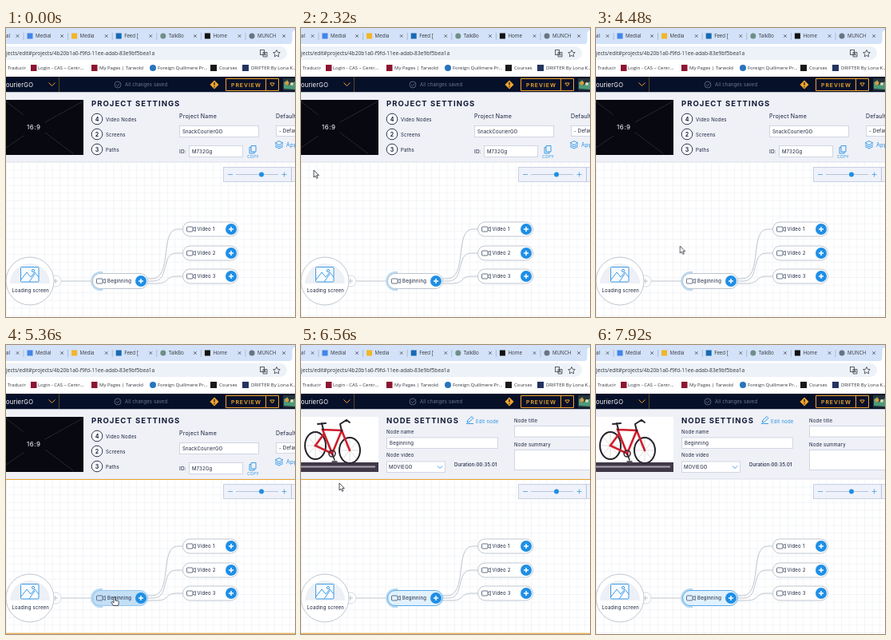
These frames come from a looping animation (362 by 362 pixels, 8 s). An HTML page:

```html
<!DOCTYPE html>
<html lang="en">
<head>
<meta charset="utf-8">
<title>Project editor</title>
<style>
  html, body { margin: 0; width: 100%; height: 100%; overflow: hidden; background: #fff; }
  svg { display: block; width: 100vw; height: 100vh; }
  text { font: 6px Inter, sans-serif; letter-spacing: .2px; fill: #18213c; }
  .chrome text { font: 6px "Open Sans", "Noto Sans", sans-serif; letter-spacing: 0; fill: #30343b; }
  .chrome .url { font-size: 6.65px; }
  .chrome .tab { font-size: 6.2px; }
  text.title { font-size: 9.5px; font-weight: 700; letter-spacing: 1.05px; fill: #111a36; }
  text.label { font-size: 7px; }
  .field { fill: #fff; stroke: #c9cedb; stroke-width: .8; }
  .wire { fill: none; stroke: #b7bfca; stroke-width: .9; }
  .blue { fill: none; stroke: #3b9be6; stroke-width: 1; stroke-linejoin: round; }
  .orange { fill: none; stroke: #efa32c; stroke-width: 1; }
</style>
</head>
<body>
<svg viewBox="0 0 362 362" preserveAspectRatio="none">
  <defs>
    <pattern id="grid" width="9.6" height="9.6" patternUnits="userSpaceOnUse" y="168">
      <path d="M0 .5H9.6M.5 0V9.6" stroke="#eff1f4" stroke-width=".8" fill="none"/>
    </pattern>
    <g id="camera" fill="none" stroke="#56627a" stroke-width=".9" stroke-linejoin="round">
      <rect x="-5.5" y="-3" width="7.5" height="6" rx="1"/>
      <path d="M2-.8L5.3-2.7V2.7L2 .8"/>
    </g>
    <g id="add">
      <circle r="7" fill="#1f8fe6"/>
      <path d="M-3 0H3M0-3V3" stroke="#fff" stroke-width="1.5"/>
    </g>
  </defs>

  <g class="chrome">
    <rect width="362" height="24" fill="#d3e2f8"/>
    <path d="M356 20Q358.500 19 358.500 15V7Q359 3 362 3V20Z" fill="#fff"/>
    <rect y="20" width="362" height="41" fill="#fff"/>
    <rect x="-12" y="23" width="364" height="17" rx="8.500" fill="#edf1f8"/>
    <text class="url" x="0" y="34.300">jects/edit#projects/4b20b1a0-f9fd-11ee-adab-83e9bf5bea1a</text>
    <g fill="none" stroke="#4c5059" stroke-width=".9">
      <rect x="318.500" y="27.500" width="5" height="6"/>
      <path d="M322 30.500H327V36H322Z M323.500 34.500L324.600 31.700L325.700 34.500"/>
      <path d="M339 27.500l1.300 2.800 3 .4-2.200 2.100.6 3.100-2.700-1.500-2.700 1.500.6-3.100-2.200-2.100 3-.4z"/>
    </g>
    <g id="tabs"></g>
    <text x="2" y="52.200">Traducir</text>
    <rect x="31" y="46" width="7.500" height="8" fill="#8c1531"/>
    <text x="40" y="52.200">Login - CAS – Centr...</text>
    <rect x="107" y="46" width="7.500" height="8" fill="#8c1531"/>
    <text x="117" y="52.200">My Pages | Tarwold</text>
    <circle cx="184" cy="50" r="4" fill="#2874bd"/>
    <text x="190" y="52.200">Foreign Quillmere Pr...</text>
    <rect x="256" y="46" width="8" height="8" fill="#191919"/>
    <text x="267" y="52.200">Courses</text>
    <rect x="296" y="46" width="8" height="8" fill="#23345f"/>
    <text x="307" y="52.200">DRIFTER By Lona K...</text>
  </g>

  <rect y="61" width="362" height="19.500" fill="#071029"/>
  <text x="0" y="73.800" style="font-size:7.600px;fill:#fff">ourierGO</text>
  <path class="orange" d="M53.500 68.500L57.500 72.500L61.500 68.500"/>
  <path d="M66.500 61V80" stroke="#6d5427" stroke-width=".8"/>
  <g fill="none" stroke="#697289" stroke-width=".8">
    <circle cx="140" cy="71" r="4"/><path d="M138 71L139.600 72.700L142.300 69.500"/>
  </g>
  <text x="149" y="73" style="font-size:5.800px;fill:#737b90">All changes saved</text>
  <path d="M261 65.500L266.500 71L261 76.500L255.500 71Z" fill="#f3a52c"/>
  <path d="M261 68V71.700M261 73V74.200" stroke="#071029" stroke-width="1.200"/>
  <path class="orange" d="M275.500 63.500H341.500V78.500H275.500ZM325.500 63.500V78.500M330.800 69H336.200L333.500 73Z" stroke-width=".9"/>
  <text x="282" y="73.500" style="font-size:6.800px;font-weight:600;letter-spacing:1px;fill:#f6a92f">PREVIEW</text>
  <rect x="347" y="63" width="15" height="15.500" fill="#24323b"/>
  <path d="M348 76V68L353 65V72L362 67V77Z" fill="#4c9a78"/>
  <circle cx="352" cy="69" r="2.500" fill="#d79a3d"/><circle cx="358" cy="70" r="2" fill="#ddd8bb"/>

  <rect y="80.500" width="362" height="87.500" fill="#eff1f7"/>
  <g id="project">
    <rect y="90" width="97" height="69" fill="#070810"/>
    <path d="M0 92L22 109M49 131L85 158M96 92L49 118M22 135L0 150" stroke="#5d6069" stroke-width=".6" stroke-dasharray="1.500 1"/>
    <text x="26" y="127" style="font-size:8px;letter-spacing:.5px;fill:#fff">16:9</text>
    <text class="title" x="107" y="98">PROJECT SETTINGS</text>
    <g id="counts"></g>
    <text class="label" x="217" y="113">Project Name</text>
    <rect class="field" x="217.500" y="122.500" width="99" height="14"/>
    <text x="221" y="131.700">SnackCourierGO</text>
    <text class="label" x="217" y="157" style="font-size:6.500px">ID:</text>
    <rect class="field" x="229.500" y="147.500" width="67" height="14"/>
    <text x="233" y="157">M732Gg</text>
    <path class="blue" d="M307 147.500H313V155H307ZM307 149.500H305V157H311V155"/>
    <text x="302" y="162.500" style="font-size:5px;fill:#2b91e2">COPY</text>
    <text class="label" x="338" y="113">Default</text>
    <rect class="field" x="338.500" y="122.500" width="30" height="13"/>
    <text x="342" y="131">- Default</text>
    <path class="blue" d="M342 141.500L347 144L342 146.500L337 144ZM337 146.300L342 148.800L347 146.300M337 148.500L342 151L347 148.500"/>
    <text class="label" x="351" y="148.700" style="fill:#2b91e2">Apply</text>
  </g>

  <g id="node" opacity="0">
    <rect y="90" width="97" height="69" fill="#fff"/>
    <g fill="none" stroke-linecap="round">
      <g stroke="#242329" stroke-width="2">
        <ellipse cx="18" cy="126" rx="13" ry="17"/><ellipse cx="61" cy="132" rx="13" ry="16"/>
      </g>
      <g stroke="#aaa6a8" stroke-width=".4">
        <path d="M18 110V142M6 126H30M9 115L27 137M27 115L9 137M61 117V147M49 132H73M52 121L70 143M70 121L52 143"/>
      </g>
      <path d="M27 106L51 107L39 136ZM27 106L39 136L18 126L29 111M51 107L61 132" stroke="#cf1e2d" stroke-width="2.600"/>
      <path d="M21 99L31 98M26 98L28 106M49 99L51 108M49 99L57 94L61 97" stroke="#26242a" stroke-width="2"/>
      <circle cx="39" cy="136" r="4" stroke="#333038" stroke-width="1.600"/>
      <path d="M39 136L42 144M39 146H45" stroke="#26242a" stroke-width="1.500"/>
    </g>
    <rect y="147" width="97" height="12" fill="#30283a" opacity=".92"/>
    <path d="M0 152.500H93" stroke="#aaa6ae" stroke-width="2"/>
    <text class="title" x="107" y="98">NODE SETTINGS</text>
    <path class="blue" d="M208 97L209 94L214 89.500L216 91.500L211 96.200ZM207 98.500H216"/>
    <text x="219" y="97.700" style="fill:#2b91e2">Edit node</text>
    <text x="107" y="110.500">Node name</text>
    <rect class="field" x="107.500" y="116" width="139" height="13.500"/>
    <text x="111" y="125">Beginning</text>
    <text x="107" y="140">Node video</text>
    <rect class="field" x="107.500" y="146" width="73" height="13.500"/>
    <text x="110" y="155">MOVIEGO</text>
    <path class="blue" d="M171 151.500L174 154.500L177 151.500"/>
    <text x="192" y="152.200" style="font-size:5.900px;font-weight:500">Duration:00:35.01</text>
    <text x="267" y="96.500">Node title</text>
    <rect class="field" x="267.500" y="101.500" width="100" height="13.500"/>
    <text x="267" y="126.500">Node summary</text>
    <rect class="field" x="267.500" y="131.500" width="100" height="25"/>
  </g>

  <rect y="168" width="362" height="194" fill="#fff"/>
  <rect y="168" width="362" height="194" fill="url(#grid)"/>
  <path d="M0 167.700H362" stroke="#dfe3ec" stroke-width=".7"/>

  <rect x="272.500" y="174.500" width="92" height="18" fill="#eff2fa" stroke="#c3cde1" stroke-width=".9"/>
  <path d="M357.500 174.500V192.500M288 183.500H341" stroke="#b1bfd8" stroke-width=".9"/>
  <path d="M278 183.500H284M345.500 183.500H351.500M348.500 180.500V186.500" stroke="#5aa5e2" stroke-width=".9"/>
  <circle cx="320" cy="183.500" r="3" fill="#1f8fe6"/>

  <path class="wire" d="M60 317H108M177 314H183C209 314 192 252 215 252H221M177 317H185C205 317 194 282 213 282H221M177 320H190C204 320 200 311 213 311H221"/>
  <circle cx="62" cy="317" r="7" fill="#fff" stroke="#d0d5dd" stroke-width=".9"/>
  <path d="M59 317H65M62 314V320" stroke="#b7bfca" stroke-width=".9"/>
  <circle cx="30" cy="317" r="30" fill="#fff" stroke="#b7c0cb" stroke-width=".9"/>
  <path d="M5 320A25 25 0 0 1 55 320Z" fill="#edf0f6"/>
  <g class="blue">
    <rect x="18.500" y="299.500" width="22.500" height="18.500" rx="1" fill="#f8fbff"/>
    <path d="M19 315L26 306L31 312L36 306L41 312M29 318L36 308"/><circle cx="34" cy="304" r="1.600"/>
  </g>
  <text x="7.500" y="331">Loading screen</text>

  <g id="videos"></g>
  <path d="M121 306.800A10.500 10.500 0 1 0 121 327.200" fill="none" stroke="#b9daf2" stroke-width="3.500"/>
  <rect id="pill" x="108.500" y="307.500" width="69" height="19" rx="9.500" stroke-width=".9"/>
  <use href="#camera" x="119" y="317"/>
  <text x="127" y="319">Beginning</text>
  <use href="#add" x="169" y="317"/>

  <path id="focus" class="orange" d="M0 168.500H362M0 361.300H362" opacity="0"/>

  <g id="cursor" opacity="0">
    <path id="arrow" d="M0 0V9L2 7.200L3.500 10.300L5 9.600L3.600 6.600H6.300Z" fill="#fff" stroke="#22242b" stroke-width=".8"/>
    <path id="hand" opacity="0" d="M-1 0Q0-1.200 1 0V4L4.500 4.700Q5.500 5 5.300 6.500L4.500 10.500H-1.500L-4 6.500Q-3.500 5-2.200 5.800L-1 7Z" fill="#fff" stroke="#22242b" stroke-width=".8"/>
  </g>
</svg>

<script>
const LOOP = 8000, STEP = 80;
const $ = id => document.getElementById(id);

const tabs = [
  ["Medial", "#4285e8"], ["Media", "#f3b526"], ["Feed [", "#1769b4"],
  ["TalkBo", "#6f8f87"], ["Home", "#111"], ["MUNCH", "#697482"]
];
$("tabs").innerHTML = `<text class="tab" x="0" y="12.300">al</text>` +
  [0, 1, 2, 3, 4, 5, 6].map(i => {
    const x = 14.5 + i * 55.6;
    return `<path d="M${x - 1.8} 8.200l3.600 3.600m0-3.600l-3.600 3.600" stroke="#444a54" stroke-width=".8"/>` +
      (i < 6 ? `<path d="M${x + 7.5} 6v9" stroke="#9bacca" stroke-width=".7"/>` : "");
  }).join("") +
  tabs.map(([name, color], i) => {
    const x = 26.5 + i * 55.6;
    const icon = i === 3 || i === 5
      ? `<circle cx="${x + 3.5}" cy="10" r="3.500" fill="${color}"/>`
      : `<rect x="${x}" y="6.500" width="7" height="7" fill="${color}"/>`;
    return icon + `<text class="tab" x="${x + 10.5}" y="12.300">${name}</text>`;
  }).join("");

$("counts").innerHTML = [[4, "Video Nodes"], [2, "Screens"], [3, "Paths"]].map(([n, name], i) => {
  const y = 114 + i * 19;
  return `<circle cx="114" cy="${y}" r="6.800" fill="#fff" stroke="#17203b" stroke-width=".9"/>
    <text x="114.100" y="${y + 2.6}" text-anchor="middle" style="font-size:7px;font-weight:700">${n}</text>
    <text x="125" y="${y + 2.5}">${name}</text>`;
}).join("");

$("videos").innerHTML = [252, 282, 311].map((y, i) =>
  `<rect x="221.500" y="${y - 9}" width="69" height="18" rx="9" fill="#fff" stroke="#b7c0cb" stroke-width=".9"/>
   <use href="#camera" x="232" y="${y}"/>
   <text x="239.500" y="${y + 2}">Video ${i + 1}</text>
   <use href="#add" x="282" y="${y}"/>`).join("");

// Each row is [time, value]; the first value holds from 0, the last until the loop ends.
function play(id, prop, rows, moving = false) {
  const all = [[0, rows[0][1]], ...rows, [LOOP, rows.at(-1)[1]]];
  const frames = all.map(([time, value], i) => {
    const span = all[i + 1] ? all[i + 1][0] - time : 0;
    const easing = moving && span ? `steps(${Math.max(1, Math.round(span / STEP))}, end)` : "step-end";
    return { offset: time / LOOP, [prop]: value, easing };
  });
  $(id).animate(frames, { duration: LOOP, iterations: Infinity });
}
const show = (id, from, to) => play(id, "opacity", [[0, 0], [from, 1], [to, 0]]);

const path = [
  [2160, 15, 176], [2320, 16, 178], [2640, 25, 186], [2800, 25, 186],
  [3440, 72, 227], [3680, 72, 227], [4400, 101, 267], [5040, 136, 316],
  [5520, 136, 316], [6160, 76, 213], [6560, 48, 173], [6800, 48, 173], [7120, 8, 170]
];
play("cursor", "transform", path.map(([t, x, y]) => [t, `translate(${x}px, ${y}px)`]), true);
show("cursor", 2160, 7120);
show("hand", 4960, 5680);
play("arrow", "opacity", [[0, 1], [4960, 0], [5680, 1]]);

show("focus", 5360, 7520);
play("project", "opacity", [[0, 1], [5600, 0]]);
play("node", "opacity", [[0, 0], [5600, 1]]);
play("pill", "fill", [[0, "#fff"], [4960, "#c3dff5"], [5680, "#e1f1fd"]]);
play("pill", "stroke", [[0, "#b7c0cb"], [4960, "#8fc3ec"], [5680, "#4ba3e8"]]);
</script>
</body>
</html>
```
